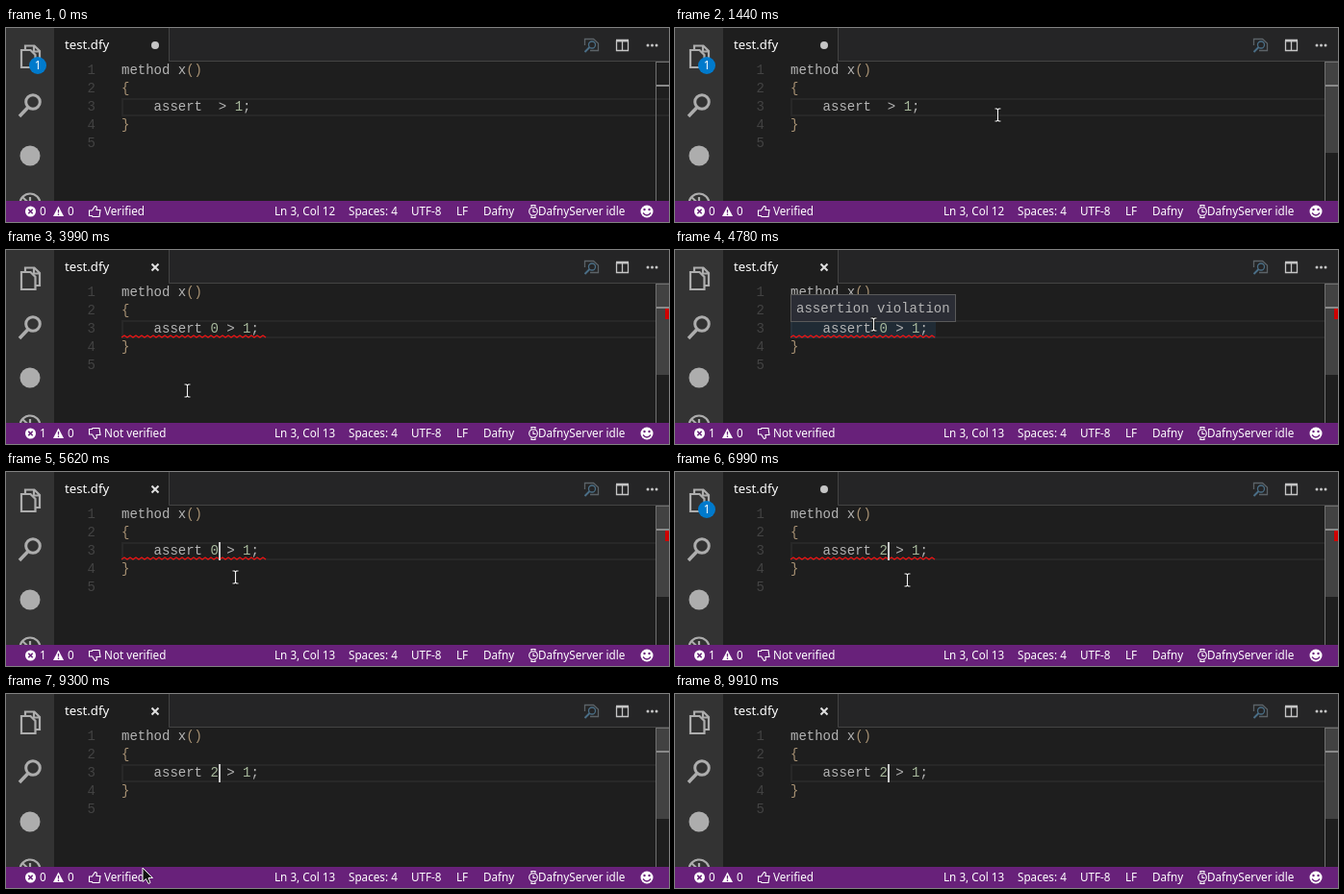
Write an HTML page that moves like this. It is 689 px wide and 202 px high and loops after 9960 ms.

```html
<!DOCTYPE html>
<html lang="en">
<head>
<meta charset="utf-8">
<title>Editor verification</title>
<style>
html, body { margin: 0; width: 100%; height: 100%; overflow: hidden; background: #1e1e1e; }
svg { display: block; width: 689px; height: 202px; }
text { white-space: pre; }
.code { font: 14px "Liberation Mono", monospace; fill: #b4b4b4; }
.num { fill: #434343; text-anchor: end; }
.brace { fill: #a89274; }
.digit { fill: #a6b79b; }
.ui { font: 11.7px "Noto Sans", sans-serif; fill: #fff; }
.line { fill: none; stroke: #adadad; stroke-width: 2.2; }
.white { fill: none; stroke: #fff; stroke-width: 1.1; }
</style>
</head>
<body>
<svg viewBox="0 0 689 202">
  <rect width="689" height="202" fill="#1e1e1e"/>
  <rect x="50" width="639" height="35" fill="#252526"/>
  <rect x="50" width="120" height="35" fill="#1e1e1e"/>
  <path d="M169.500 0V34.500H689" fill="none" stroke="#444"/>

  <!-- activity bar -->
  <rect width="50" height="180" fill="#333"/>
  <g class="line">
    <path d="M20 23V18.500H29.500L35 24V37H31M29 19V24.500H35"/>
    <path d="M16 23H25.500L30.500 28V41H16Z"/>
    <circle cx="28" cy="77" r="7.300" stroke-width="3"/>
    <path d="M22.500 83L14 92" stroke-width="3.500"/>
    <circle cx="25" cy="183" r="10.500"/>
    <path d="M17 176L32 190M25 176V183M20 181H30"/>
  </g>
  <circle cx="25" cy="133" r="10.500" fill="#adadad"/>
  <g id="badge">
    <circle cx="33" cy="39" r="9" fill="#007acc"/>
    <text class="ui" x="33" y="43" text-anchor="middle">1</text>
  </g>

  <!-- tab and actions -->
  <text x="61" y="21.500" font-family="Noto Sans, sans-serif" font-size="13.200" fill="#fff">test.dfy</text>
  <circle id="dot" cx="155" cy="18" r="4" fill="#c5c5c5"/>
  <path id="close" d="M151.500 14.500L158.500 21.500M158.500 14.500L151.500 21.500" stroke="#e0e0e0" stroke-width="2"/>
  <g fill="none" stroke="#5c6368" stroke-width="1.300">
    <path d="M601.500 18V11.500H610.500L615.500 16V23.500H607"/>
    <circle cx="609" cy="17.500" r="3.500" stroke="#4a6e86"/>
    <path d="M606.500 20L601.500 25" stroke="#4a6e86" stroke-width="2"/>
  </g>
  <path d="M634 13.500H646.500V23.500H634.500V13M640.500 13V24" fill="none" stroke="#c5c5c5" stroke-width="1.300"/>
  <path d="M634 13H647" stroke="#c5c5c5" stroke-width="2.500"/>
  <g fill="#c5c5c5"><circle cx="667" cy="18" r="1.500"/><circle cx="671.500" cy="18" r="1.500"/><circle cx="676" cy="18" r="1.500"/></g>

  <!-- editor -->
  <rect x="121" y="74" width="580" height="17" fill="none" stroke="#282828" stroke-width="2"/>
  <rect id="range" x="120" y="73" width="151" height="19" fill="#264f78" opacity="0"/>
  <g id="numbers" class="code"></g>
  <g class="code">
    <text x="120" y="48">method x<tspan class="brace">()</tspan></text>
    <text class="brace" x="120" y="67">{</text>
    <text x="120" y="86">    assert <tspan id="typed" class="digit"></tspan> &gt; <tspan class="digit">1</tspan>;</text>
    <text class="brace" x="120" y="105">}</text>
  </g>
  <path id="squiggle" fill="none" stroke="#f01414" stroke-width="1.300"/>
  <rect id="caret" y="73" width="2" height="19" fill="#c8c8c8"/>
  <rect id="slider" x="676" y="35" width="13" height="95" fill="#424242"/>
  <path d="M675.500 35V180" stroke="#707070"/>
  <path d="M676 35.500H689" stroke="#707070"/>
  <rect x="676" y="59" width="13" height="2" fill="#8a8a8a"/>
  <rect id="mark" x="685" y="61" width="4" height="11" fill="#d00000"/>
  <g id="tip">
    <rect x="120.500" y="46.500" width="171" height="28" fill="#2b2d35" stroke="#5a5a5a"/>
    <text class="code" x="126" y="64.500">assertion violation</text>
  </g>

  <!-- status bar -->
  <rect y="180" width="689" height="22" fill="#68217a"/>
  <circle cx="25.500" cy="191" r="5.500" fill="#fff"/>
  <path d="M23.300 188.800L27.700 193.200M27.700 188.800L23.300 193.200" stroke="#68217a" stroke-width="1.600"/>
  <path d="M54.500 185.500L60 196H49Z" fill="#fff"/>
  <path d="M54.500 189V192.500M54.500 193.500V195" stroke="#68217a" stroke-width="1.300"/>
  <path id="thumb" class="white" d="M86.500 190H89.500L92.500 185.500Q95 185 94 189.500H98L97 196.500H90L89.500 195.500H86.500Z"/>
  <g id="status" class="ui"></g>
  <circle class="white" cx="548" cy="191" r="4.300"/>
  <path class="white" d="M546 186.500V184.500H550V186.500M546 195.500V197.500H550V195.500M548 188.500V191.500H550.500"/>
  <circle cx="666" cy="191" r="6.500" fill="#fff"/>
  <g fill="#68217a"><circle cx="663.500" cy="189" r="1.200"/><circle cx="668.500" cy="189" r="1.200"/></g>
  <path d="M662 192.500Q666 197.500 670 192.500" fill="none" stroke="#68217a" stroke-width="1.300"/>

  <g id="mouse">
    <g id="beam" fill="none">
      <path d="M-3 -6.500H-1L0 -5.500L1 -6.500H3M0 -6V6M-3 6.500H-1L0 5.500L1 6.500H3" stroke="#111" stroke-width="3"/>
      <path d="M-3 -6.500H-1L0 -5.500L1 -6.500H3M0 -6V6M-3 6.500H-1L0 5.500L1 6.500H3" stroke="#f4f4f4" stroke-width="1.200"/>
    </g>
    <path id="arrow" d="M.500 .500V15L4 12L6.500 17L8.500 16L6.500 11H11Z" fill="#111" stroke="#f4f4f4"/>
  </g>
</svg>
<script>
const LOOP = 9960, CHAR = 8.4;
const $ = id => document.getElementById(id);
const show = (id, on) => $(id).setAttribute("visibility", on ? "visible" : "hidden");
const set = (id, name, value) => $(id).setAttribute(name, value);
const within = (t, a, b) => t >= a && t < b;
const ramp = (t, start, length) => Math.max(0, Math.min(1, (t - start) / length));

function addText(parent, x, y, value, className) {
  const el = document.createElementNS("http://www.w3.org/2000/svg", "text");
  el.setAttribute("x", x);
  el.setAttribute("y", y);
  if (className) el.setAttribute("class", className);
  el.textContent = value;
  return $(parent).appendChild(el);
}

for (let i = 0; i < 5; i++) addText("numbers", 93, 48 + 19 * i, i + 1, "num");
const label = (x, value) => addText("status", x, 195, value);
const errors = label(35, "0");
label(64, "0");
const verdict = label(102, "Verified");
const position = label(279, "");
label(356, "Spaces: 4");
label(421, "UTF-8");
label(468, "LF");
label(496, "Dafny");
const server = label(553, "");

// times at which the text caret turns on or off
const blinks = [610, 1110, 1560, 2050, 2550, 3010, 3450, 3900, 4350, 4780, 5260,
  5700, 6210, 6680, 6850, 7530, 8020, 8500, 9010, 9500, 9910];

// pointer path: time, x, y
const path = [
  [150, 257, 20], [390, 217, 82], [750, 216, 82], [930, 216, 82], [1440, 335, 90],
  [1520, 336, 90], [2730, 336, 90], [3010, 285, 125], [3190, 284, 125],
  [3640, 154, 188], [3760, 158, 189], [4150, 206, 121], [4390, 206, 77],
  [5260, 206, 77], [5700, 241, 112], [8360, 241, 112], [8460, 241, 111],
  [8850, 241, 111], [9400, 131, 187], [9640, 132, 189], [9820, 140, 192], [9900, 144, 198]
];

function pointerAt(t) {
  const i = path.findIndex(p => p[0] > t);
  if (i < 1) return null;
  const [a, b] = [path[i - 1], path[i]];
  const k = (t - a[0]) / (b[0] - a[0]);
  const e = k * k * (3 - 2 * k);
  return [1, 2].map(j => Math.round(a[j] + (b[j] - a[j]) * e));
}

function squiggle(end) {
  let d = "M120 91";
  for (let x = 123, up = true; x <= end; x += 3, up = !up) d += `L${x} ${up ? 89 : 91}`;
  return d;
}

function draw(t) {
  const digit = within(t, 1560, 6850) ? "0" : t >= 6990 ? "2" : "";
  const dirty = t < 2550 || within(t, 6850, 8020);
  const failed = within(t, 2770, 8360);
  const busy = within(t, 2550, 2770) || within(t, 8020, 8360);

  $("typed").textContent = digit;
  position.textContent = "Ln 3, Col " + (12 + digit.length);
  errors.textContent = failed ? "1" : "0";
  verdict.textContent = failed ? "Not verified" : "Verified";
  server.textContent = "DafnyServer " + (busy ? "busy" : "idle");
  set("thumb", "transform", failed ? "matrix(1 0 0 -1 0 382)" : "");

  show("badge", dirty);
  show("dot", dirty);
  show("close", !dirty);
  show("mark", failed);
  show("squiggle", failed);
  set("squiggle", "d", squiggle(120 + CHAR * (17 + digit.length)));

  set("caret", "x", digit ? 221 : 212);
  show("caret", blinks.filter(b => b <= t).length % 2);

  const tip = t < 5260 ? ramp(t, 4580, 200) : 0;
  set("tip", "opacity", tip);
  set("range", "opacity", tip * 0.25);

  // the scrollbar appears once the pointer is over the editor
  set("slider", "opacity", ramp(t, 190, 100));

  const p = pointerAt(t);
  const arrow = p && (p[1] < 35 || p[1] >= 180);
  show("beam", p && !arrow);
  show("arrow", arrow);
  if (p) set("mouse", "transform", `translate(${p[0] + 0.5} ${p[1] + 0.5})`);
}

function frame() {
  draw(Math.floor(performance.now() % LOOP / 10) * 10);
  requestAnimationFrame(frame);
}
frame();
</script>
</body>
</html>
```
